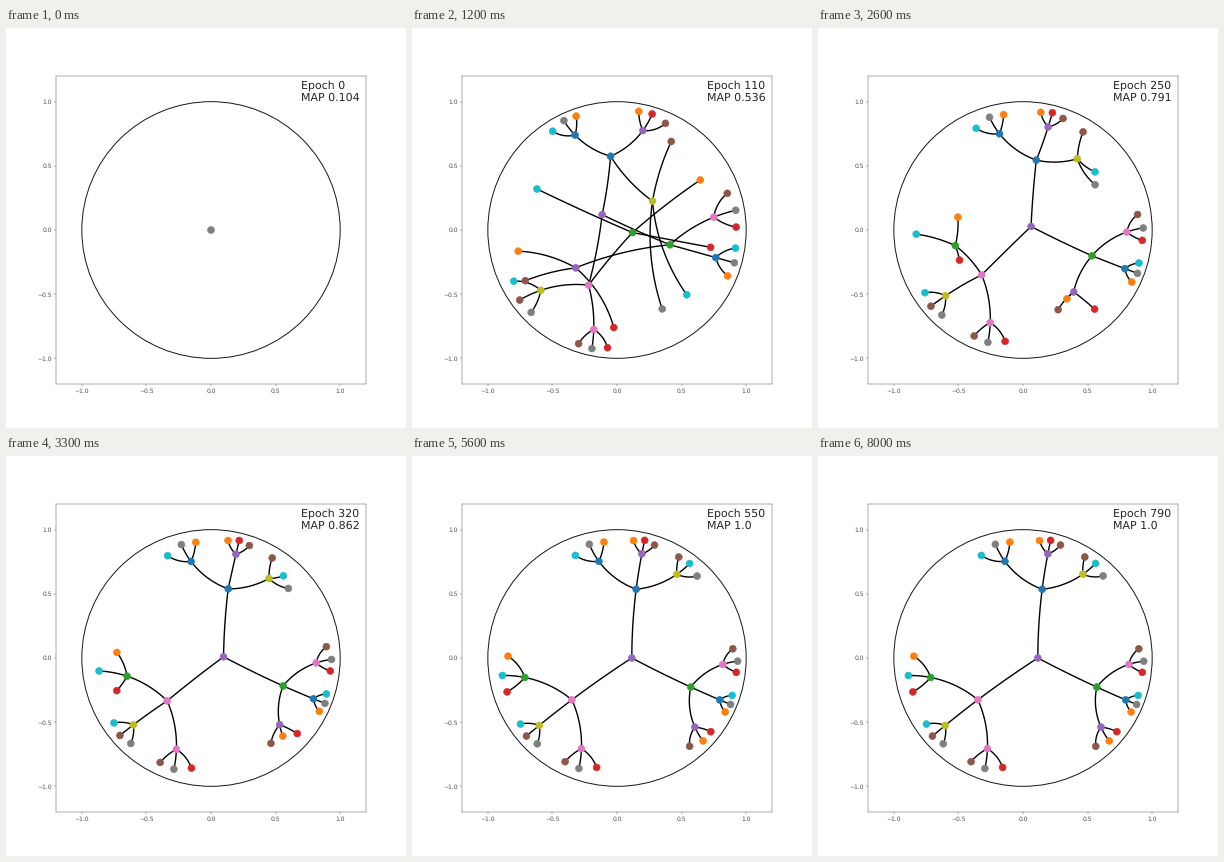
Animation of 400x400 px, one loop 8100 ms. Source, as a matplotlib script:

```python
import numpy as np
import matplotlib.pyplot as plt
from matplotlib.animation import FuncAnimation
from matplotlib.collections import LineCollection

FRAMES, INTERVAL = 81, 100
SPREAD_END = 12  # frame at which the nodes have left the centre

# Ternary tree in breadth-first order: root, 3 branches, 9 hubs, 27 leaves
NODES = 40
PARENT = (np.arange(1, NODES) - 1) // 3
# tab10 digits, in the same order as the nodes
COLOURS = [int(c) for c in "4" "062" "048" "682" "604"
           "971" "135" "597" "375" "759" "391" "573" "971" "315"]
# Grey nodes first, so that the single starting dot is grey
ORDER = np.argsort([c != 7 for c in COLOURS], kind="stable")

# Hyperbolic step and turn in degrees to each of the three children
BRANCH_FAN = [(0.545, 0), (0.545, 123), (0.545, -118)]
HUB_FAN = [(0.56, 77), (0.52, 0), (0.56, -77)]
LEAF_FAN = [(0.5, 60), (0.5, 0), (0.5, -60)]

# Where the inner nodes and three stray families lie while still tangled
TANGLED = dict(enumerate([
    -0.115 + 0.12j, -0.05 + 0.575j, -0.22 - 0.43j, 0.41 - 0.115j,
    -0.325 + 0.74j, 0.20 + 0.775j, 0.275 + 0.225j,
    -0.18 - 0.775j, -0.59 - 0.47j, 0.12 - 0.02j,
    0.75 + 0.10j, 0.765 - 0.215j, -0.32 - 0.295j]))
TANGLED |= {19: 0.42 + 0.69j, 20: 0.54 - 0.505j, 21: 0.35 - 0.615j,
            28: 0.725 - 0.135j, 29: -0.62 + 0.32j, 30: 0.645 + 0.39j,
            37: -0.025 - 0.76j, 38: -0.765 - 0.165j, 39: -0.71 - 0.395j}


def mobius(a, w):
    """Move w by the disc translation that takes 0 to a."""
    return (w + a) / (1 + np.conj(a) * w)


def grow_tree(fixed, leaf_scale=1):
    """Fan each family out, away from its grandparent, except fixed nodes."""
    z = np.zeros(NODES, complex)
    z[0] = fixed[0]
    for i, parent in enumerate(PARENT, start=1):
        if parent == 0:
            fan, heading = BRANCH_FAN, 1j
        else:
            fan = HUB_FAN if parent < 4 else LEAF_FAN
            heading = -mobius(-z[parent], z[PARENT[parent - 1]])
            heading /= abs(heading)
        step, turn = fan[(i - 1) % 3]
        if fan is LEAF_FAN:
            step *= leaf_scale
        z[i] = fixed.get(i, mobius(z[parent], step * heading * np.exp(1j * np.radians(turn))))
    return z


START = grow_tree(TANGLED, leaf_scale=1.2)
SETTLED = grow_tree({0: 0.115})


def positions(frame):
    spread = 1 - np.exp(-(frame / 3.2) ** 1.6)
    tangle = np.exp(-(max(0, frame - SPREAD_END) / 10.5) ** 1.35)
    return spread * (SETTLED + tangle * (START - SETTLED))


def geodesics(a, b, samples=40):
    a, b = a[:, None], b[:, None]
    z = mobius(a, mobius(-a, b) * np.linspace(0, 1, samples))
    return np.stack([z.real, z.imag], axis=-1)


def precision(frame):
    value = np.interp(frame, [0, 12, 20, 33, 45, 56],
                      [0.104, 0.536, 0.730, 0.862, 0.962, 1])
    return f"{value:.3f}" if value < 0.9995 else "1.0"


plt.rcParams.update({"text.hinting": "none", "text.hinting_factor": 1,
                     "axes.edgecolor": "0.3", "xtick.color": "0.3", "ytick.color": "0.3"})
fig, ax = plt.subplots(figsize=(10, 10), dpi=40)
ticks = np.linspace(-1, 1, 5)
ax.set(xlim=(-1.2, 1.2), ylim=(-1.2, 1.2), xticks=ticks, yticks=ticks)

ax.add_patch(plt.Circle((0, 0), 1, fill=False, ec="0.1", lw=1.8))
edges = ax.add_collection(LineCollection([], colors="black", linewidths=2.5, zorder=2))
dots = ax.scatter(np.zeros(NODES), np.zeros(NODES), s=155, linewidths=1, zorder=3,
                  c=[f"C{COLOURS[i]}" for i in ORDER])
label = ax.text(0.7, 1.008, "", fontsize=20, color="0.15")


def update(frame):
    z = positions(frame)
    points = np.column_stack([z.real, z.imag])[ORDER]
    edges.set_segments(geodesics(z[PARENT], z[1:]) if frame else [])
    dots.set_offsets(points if frame else points[:1])
    label.set_text(f"Epoch {10 * max(0, frame - 1)}\nMAP {precision(frame)}")
    return edges, dots, label


anim = FuncAnimation(fig, update, frames=FRAMES, interval=INTERVAL, repeat=True)
plt.show()
```
